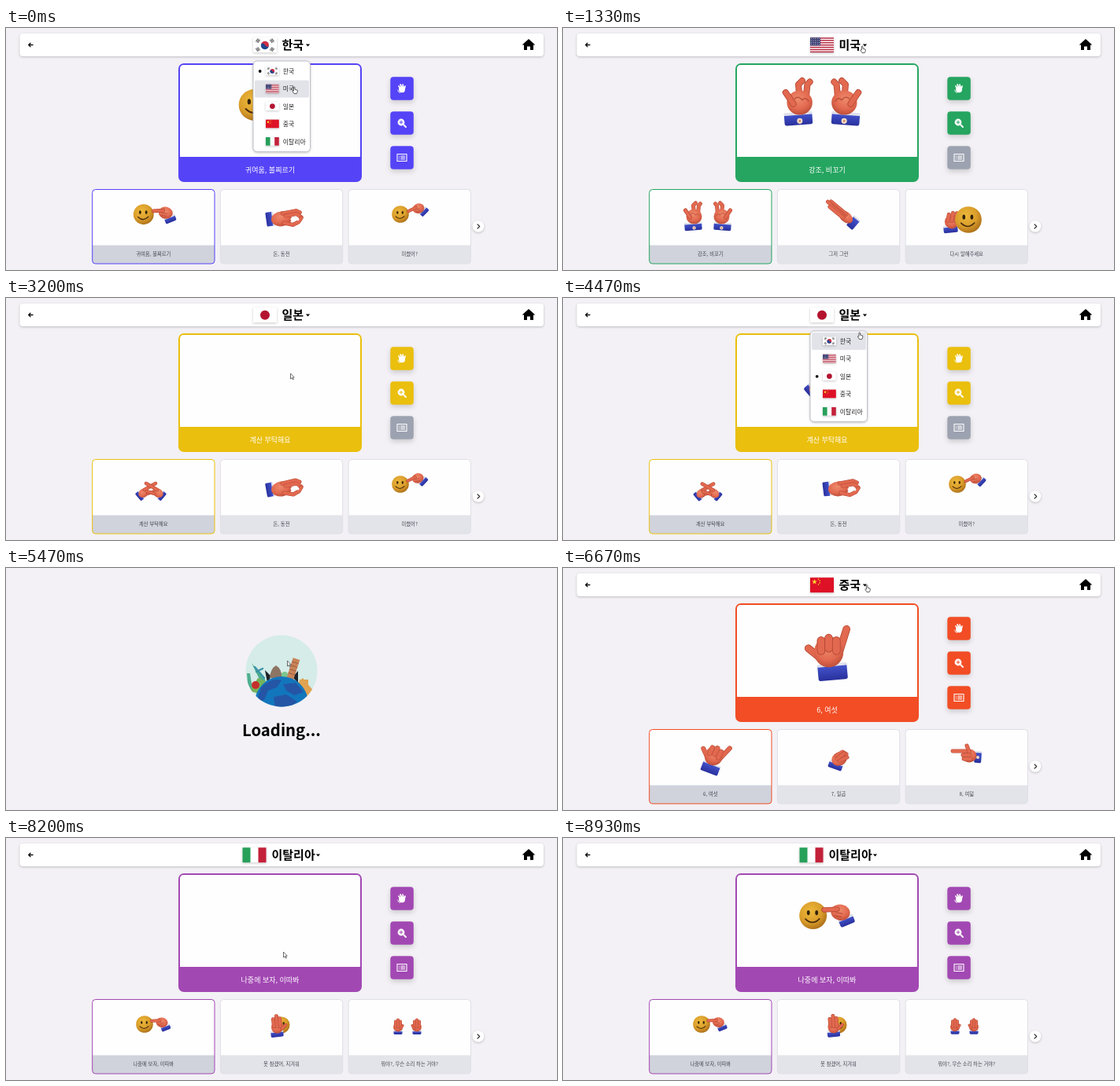
An HTML page that plays this animation: 700x308 px, repeating every 9000 ms.

```html
<!DOCTYPE html>
<html lang="ko">
<head>
<meta charset="utf-8">
<style>
html, body { margin: 0; width: 100%; height: 100%; overflow: hidden; background: #f3f1f5; }
svg { display: block; width: 100vw; height: 100vh; }
text { font-family: "Noto Sans CJK KR", "Noto Sans CJK", "Noto Sans CJK JP", sans-serif; }
.mid { text-anchor: middle; }
.soft { filter: drop-shadow(0 1px 1.5px rgba(0,0,0,.22)); }
.lift { filter: drop-shadow(0 3px 3px rgba(0,0,0,.16)); }
</style>
</head>
<body>
<svg id="stage" viewBox="0 0 700 308"></svg>
<script>
const LOOP = 9000, FPS = 15;

// ---- drawing helpers
const rect = (x, y, w, h, fill, r = 0, more = '') =>
  `<rect x="${x}" y="${y}" width="${w}" height="${h}" rx="${r}" fill="${fill}" ${more}/>`;
const disc = (x, y, r, fill) => `<circle cx="${x}" cy="${y}" r="${r}" fill="${fill}"/>`;
const line = (d, color, w) =>
  `<path d="${d}" fill="none" stroke="${color}" stroke-width="${w}" stroke-linecap="round" stroke-linejoin="round"/>`;
const shape = (d, fill) => `<path d="${d}" fill="${fill}"/>`;
const group = (transform, body) => `<g transform="${transform}">${body}</g>`;
const at = (x, y, s, body, rot = 0) => group(`translate(${x} ${y}) rotate(${rot}) scale(${s})`, body);
const text = (x, y, size, weight, fill, str, cls = '') =>
  `<text x="${x}" y="${y}" font-size="${size}" font-weight="${weight}" fill="${fill}" class="${cls}">${str}</text>`;
const move = (kind, body) => `<g class="move" data-kind="${kind}">${body}</g>`;

// ---- flags, on a 30 x 19 field
const flagArt = {
  kr: rect(0, 0, 30, 19, '#fff') + disc(15, 9.5, 5, '#cf2f45') +
    shape('M10.2 8.2A5 5 0 1 0 19.8 10.8Q17.5 13 15 9.5Q12.5 6 10.2 8.2', '#20478f') +
    [[6, 4, -56], [24, 4, 56], [6, 15, 56], [24, 15, -56]].map(([x, y, a]) =>
      at(x, y, 1, line('M-2 -1.5H2M-2 0H2M-2 1.5H2', '#222', .8), a)).join(''),
  us: rect(0, 0, 30, 19, '#fff') +
    Array.from({ length: 7 }, (_, i) => rect(0, i * 2.92, 30, 1.46, '#b5263f')).join('') +
    rect(0, 0, 13, 10.2, '#3b3f73') +
    Array.from({ length: 20 }, (_, i) => disc(1.5 + i % 5 * 2.5, 1.4 + (i / 5 | 0) * 2.4, .5, '#fff')).join(''),
  jp: rect(0, 0, 30, 19, '#fff') + disc(15, 9.5, 6, '#b3132f'),
  cn: rect(0, 0, 30, 19, '#de1126') +
    shape('M5.5 2L6.4 4.3H8.8L6.9 5.8L7.6 8.2L5.5 6.8L3.4 8.2L4.1 5.8L2.2 4.3H4.6Z', '#ffd92e') +
    [[10.5, 2], [12.3, 4], [12.3, 6.8], [10.5, 8.8]].map(([x, y]) => disc(x, y, .8, '#ffd92e')).join(''),
  it: rect(0, 0, 30, 19, '#fff') + rect(0, 0, 10, 19, '#27a05a') + rect(20, 0, 10, 19, '#c3213a'),
};
const flag = (id, x, y, s) =>
  `<g class="soft">${at(x, y, s, flagArt[id])}</g>`;

// ---- hands and faces
const SKIN = '#e2694f', EDGE = '#b64a36', GLOW = '#ee8a6c';
const finger = (d, w = 5) => line(d, EDGE, w) + line(d, SKIN, w - 1.1);
const palm = (x, y, rx, ry, rot = 0) => group(`translate(${x} ${y}) rotate(${rot})`,
  `<ellipse rx="${rx}" ry="${ry}" fill="url(#skin)"/>`);
const cuff = (w, h, x, y, rot = 0, button = '') => at(x, y, 1,
  rect(-w / 2, -h / 2, w, h, 'url(#cloth)', 1.6) +
  rect(-w / 2 - .3, -h / 2 - 1, w + .6, 2.2, '#dfe0ea', 1) +
  (button && disc(1, 1.5, 2.2, '#f1d9c4') + disc(1, 1.5, .8, '#c98356')), rot);
const face = (x, y, r) => at(x, y, r / 10,
  `<circle r="10" fill="url(#sun)"/>` +
  `<ellipse cx="-3.4" cy="-2" rx="1.1" ry="1.8" fill="#33230c"/><ellipse cx="2.6" cy="-2" rx="1.1" ry="1.8" fill="#33230c"/>` +
  line('M-5.5 2.6Q-.5 7.6 4.6 2.4', '#4a2d0c', 1));

const pointing = turn => face(-11, 1, 10.8) + move('poke', group(`rotate(${turn} -2 -3)`,
  cuff(12, 6, 16.5, 6, -22) + palm(11.5, -1, 7.5, 6.3, 10) + finger('M-1.5 -3L9 -3.5', 4) +
  line('M7 1.5L12 2.5M8 -1L13 0', EDGE, .7)));
const quote = move('bend', finger('M1 -4L0 -15L3 -18') + finger('M6 -4L7 -15L9 -17')) +
  cuff(22, 9, 0, 13, -4, true) + palm(1, 0, 10, 9.5) + finger('M-4 1L-10 -8') +
  line('M-3 -3Q0 -6 3 -2M3 -2Q6 -5 8 -1', EDGE, .8);
const crossed = cuff(12, 6, -14, 8, 50) + palm(-9, 4, 7, 5.5, -35) +
  finger('M-8 0L6 -8', 4.5) + finger('M-4 5L5 2', 4);

const poses = {
  point: pointing(0),
  crazy: pointing(-24),
  coin: move('sway', cuff(18, 9, -18, 2, 80) + palm(-3, 1, 13, 9.5, -8) +
    finger('M-2 -6L15 -10L20 -8') + finger('M2 -3L16 -6L22 -2') + finger('M0 6L12 8L19 4L22 -1') +
    line('M10 1Q14 -3 18 1', '#fff', 3)),
  quotes: at(-18.5, 0, 1, quote) + group('translate(18.5 0) scale(-1 1)', quote),
  flat: move('sway', at(0, 0, 1, cuff(10, 15, 19, 0, 0) + palm(7, 0, 10, 6.5) +
    finger('M5 -3L-20 -3') + finger('M5 0L-23 0') + finger('M5 3L-17 3.4') + line('M6 -1H-18', EDGE, .6), 38)),
  listen: move('sway', cuff(18, 8, -14, 13, -8) + palm(-13, 3, 9, 9) +
    finger('M-18 2L-17 -6') + finger('M-13 2L-12 -8') + finger('M-8 2L-7 -8')) + face(8, 0, 16.8),
  cross: move('poke', crossed) + group('scale(-1 1)', move('poke', crossed)),
  six: move('rock', cuff(23, 12, 4, 16, -5) + finger('M-4 6L-15 -3', 6) + finger('M9 1L15 -18', 6) +
    palm(1, 0, 11.5, 12) + [[-5, -9], [1, -11], [7, -9]].map(([x, y]) => finger(`M${x} ${y}L${x} ${y + 8}`, 6.6)).join('')),
  seven: move('sway', cuff(18, 8, -5, 8, 20) + palm(0, -1, 10, 8.5, -25) +
    finger('M-4 -5L4 -10L9 -7') + finger('M0 1L10 -3') + finger('M-3 -1L6 -8')),
  eight: move('sway', cuff(9, 14, 15, 4, 4) + palm(4, 2, 9.5, 8.5) + finger('M3 -4L-17 -4', 5) +
    finger('M4 -3L1 -11', 5) + finger('M5 1L-4 1', 5) + finger('M6 6L-3 6', 5) + disc(15, 4, 2, '#f1d9c4')),
  fedUp: face(2, -2, 10.5) + move('poke', cuff(16, 7, -3, 10, -6) + palm(-3, 1, 7.5, 8) +
    finger('M-7 0L-8 -9') + finger('M-3 0L-4 -13') + finger('M1 0L0 -10') + finger('M3 3L8 -2', 4)),
  what: [-12, 12].map(x => group(`translate(${x} 0) scale(${x < 0 ? 1 : -1} 1)`, move('bend',
    cuff(11, 5, 0, 7) + palm(0, 0, 6, 6) + finger('M-3 0L-3 -7', 4) + finger('M0 0L0 -9', 4) +
    finger('M3 0L3 -7', 4) + finger('M4 2L6 -2', 3)))).join(''),
};

// ---- countries: thumbs are [label, pose, x, y, scale, turn]; main is [x, y, scale]
const countries = [
  { id: 'kr', name: '한국', color: '#5543f7', start: -1200, main: [336, 96, 1.85], thumbs: [
    ['귀여움, 볼찌르기', 'point', 188, 236, 1.2], ['돈, 동전', 'coin', 353, 242, 1], ['미쳤어?', 'crazy', 512, 236, 1]] },
  { id: 'us', name: '미국', color: '#25a560', start: 133, locked: true, main: [329, 95, 1.62], thumbs: [
    ['강조, 비꼬기', 'quotes', 184, 240, 1], ['그저 그런', 'flat', 354, 236, 1], ['다시 말해주세요', 'listen', 507, 244, 1]] },
  { id: 'jp', name: '일본', color: '#eabf0d', start: 3133, locked: true, main: [336, 106, 1.62], thumbs: [
    ['계산 부탁해요', 'cross', 184, 244, 1], ['돈, 동전', 'coin', 353, 242, 1], ['미쳤어?', 'crazy', 512, 236, 1]] },
  { id: 'cn', name: '중국', color: '#f24d25', start: 5600, main: [336, 107, 1.62], thumbs: [
    ['6, 여섯', 'six', 190.5, 239, 1, 26], ['7, 일곱', 'seven', 351, 244, 1], ['8, 여덟', 'eight', 512, 237, 1]] },
  { id: 'it', name: '이탈리아', color: '#a248b3', start: 8200, main: [335.5, 97, 1.62], thumbs: [
    ['나중에 보자, 이따봐', 'point', 187, 236, 1], ['못 참겠어, 지겨워', 'fedUp', 348, 240, 1], ['뭐야?, 무슨 소리 하는 거야?', 'what', 510, 241, 1]] },
];

const icons = [
  at(503, 77, 1, line('M-2 0L-4 -3M0 -1L-2 -5M2 -1L1 -5M3 1L4 -3', '#fff', 1.7) +
    `<ellipse cx="0" cy="1.2" rx="4" ry="4" fill="#fff"/>` + line('M-5.5 2Q-5 5 -2.5 5.5', '#fff', .8)),
  at(503, 121, 1, disc(-1, -1, 4.4, '#fff') + line('M2.5 2.5L5 5', '#fff', 2)),
  at(503, 165, 1, line('M-6 -4.5H6V4.5H-6Z', '#fff', 1.1) +
    line('M-3.6 -2H-3.4M-3.6 0H-3.4M-3.6 2H-3.4M-1.4 -2H3.6M-1.4 0H3.6M-1.4 2H3.6', '#fff', 1.1)),
];

const header =
  `<g class="soft">${rect(17.5, 7, 665.5, 29, '#fff', 4)}</g>` +
  line('M34 21.5H29M31 19.2L28.7 21.5L31 23.8', '#111', 1.3) +
  shape('M664 14L672.3 21.6H670V28H666V23.5H662V28H658V21.6H655.7Z', '#000');

function page(c) {
  const wide = c.name.length > 2, fx = wide ? 300.5 : 314, caret = wide ? 396.5 : 383.5;
  const [mainLabel, mainPose] = c.thumbs[0];
  const buttons = icons.map((icon, i) =>
    `<g class="lift">${rect(488.3, 62.3 + i * 44, 29.5, 29.5, i === 2 && c.locked ? '#9ca2b0' : c.color, 4)}</g>` + icon).join('') +
    line('M500 120H504M502 118V122', c.color, 1);
  const cards = c.thumbs.map(([label, pose, x, y, s, turn = 0], i) => {
    const left = 109.7 + i * 162.7;
    return rect(left, 205.5, 155.3, 94.5, '#fefefe', 4) +
      shape(`M${left} 276.5h155.3v19.5q0 4 -4 4h-147.3q-4 0 -4 -4z`, i ? '#e3e4ea' : '#d0d3dc') +
      rect(left, 205.5, 155.3, 94.5, 'none', 4, `stroke="${i ? '#dedfe5' : c.color}" stroke-width="1"`) +
      at(x, y, s, poses[pose], turn) +
      text(left + 77.6, 290.3, 6.3, 400, '#42464f', label, 'mid');
  }).join('');
  return `<g id="${c.id}">` + header + flag(c.id, fx, 12.2, 1) +
    text(wide ? 337.5 : 350.5, 26.6, 15, 900, '#000', c.name) +
    shape(`M${caret - 2.6} 20.4h5.2l-2.6 3z`, '#000') +
    rect(219, 45, 233, 151, c.color, 7) + shape('M221 164V52q0 -5 5 -5H445q5 0 5 5V164Z', '#fefefe') +
    `<g class="main">${at(...c.main, poses[mainPose])}</g>` +
    text(335.5, 184.3, 9, 500, '#fff', mainLabel, 'mid') +
    buttons + cards +
    `<g class="soft">${disc(600, 252.5, 7.3, '#fff')}</g>` + line('M599 249.8L601.7 252.5L599 255.2', '#222', 1.1) +
    '</g>';
}

const rowY = i => 55 + i * 22.4;
const menu = '<g id="menu">' +
  `<g class="soft">${rect(314, 42, 72.5, 115.5, '#fff', 5, 'stroke="#b9bcc6" stroke-width=".9"')}</g>` +
  rect(316, 0, 69, 22, '#e2e3e9', 2, 'id="hover"') +
  '<circle id="dot" cx="322.7" r="1.9" fill="#111"/>' +
  countries.map((c, i) => flag(c.id, 330, rowY(i) - 5.6, .56) + text(351.7, rowY(i) + 3, 7.9, 400, '#222', c.name)).join('') +
  '</g>';

const loading = '<g id="load">' + disc(350, 131, 45.5, '#d5ece8') + '<g clip-path="url(#round)">' +
  shape('M306 134h4l4 26h-6zM312 121l18 22l-5 5z', '#4fae8d') +
  line('M316 126L328 140M318 132L326 128', '#3b95a6', 2.5) +
  shape('M310 156L320 140L334 146L326 162Z', '#76b35c') + disc(317, 149, 5, '#c52f2b') +
  shape('M329 130L337 138L332 146ZM371 131L364 139L371 146Z', '#1c2228') +
  shape('M335 140Q336 128 343 124Q350 128 351 140Z', '#8c7564') +
  disc(354, 136, 4, '#7cc68d') +
  at(365, 128, 1, rect(-4.5, -13, 9, 27, '#c98358') + line('M-4 -8H4M-4 -3H4M-4 2H4M-4 7H4', '#9d5c3f', 1), 18) +
  shape('M366 150L377 140L392 158L380 164ZM372 142H384V152Z', '#e0a351') +
  disc(350, 172, 34, '#1276bd') +
  shape('M324 152Q338 139 350 143L344 152L333 156L328 168L319 170ZM352 148L368 146L378 158L366 162L356 156ZM340 164L356 161L370 170L360 178H342Z', '#2456a5') +
  '</g>' + text(350, 214, 20.3, 900, '#000', 'Loading...', 'mid') + '</g>';

const cursors =
  `<g id="arrow">${`<path d="M-1.5 -4V3L.2 1.5L1.4 4L2.4 3.5L1.3 1.1H3.3Z" fill="#fff" stroke="#333" stroke-width=".7"/>`}</g>` +
  `<g id="finger"><path d="M-1.6 1V-3.6q.8 -1 1.6 0V-.8L3.2 .1V2.4L2.2 4.6H-1L-3.2 1.2Q-2.6 .2 -1.6 1Z" fill="#fff" stroke="#222" stroke-width=".7"/></g>`;

const stage = document.getElementById('stage');
stage.innerHTML = `<defs>
  <radialGradient id="sun" cx=".4" cy=".35" r=".7"><stop offset="0" stop-color="#edb93c"/><stop offset=".6" stop-color="#d99c2a"/><stop offset="1" stop-color="#a86b18"/></radialGradient>
  <radialGradient id="skin" cx=".45" cy=".35" r=".7"><stop offset="0" stop-color="${GLOW}"/><stop offset=".6" stop-color="${SKIN}"/><stop offset="1" stop-color="${EDGE}"/></radialGradient>
  <linearGradient id="cloth" x2="0" y2="1"><stop offset="0" stop-color="#4455cf"/><stop offset="1" stop-color="#29309c"/></linearGradient>
  <clipPath id="round"><circle cx="350" cy="131" r="45.5"/></clipPath></defs>` +
  countries.map(page).join('') + menu + loading + cursors;

// ---- timeline
const scenes = [[0, 'kr'], [133, 'us'], [2933, 'load'], [3133, 'jp'], [5267, 'load'], [5600, 'cn'], [7867, 'load'], [8200, 'it']];
const menuOpen = [[0, 133], [1533, 2933], [4133, 5267], [6867, 7867]];
const path = [[0, 367, 79], [400, 367, 79], [1200, 381, 27], [1650, 381, 27], [2450, 363, 100], [3300, 363, 100],
  [3950, 383, 26], [4250, 383, 26], [4950, 359, 122], [5700, 359, 122], [6500, 387, 26], [6950, 387, 26],
  [7550, 354, 149], [8450, 354, 149], [8870, 372, 8]];

const el = id => document.getElementById(id);
const show = (node, on) => { node.style.display = on ? '' : 'none'; };
const ease = k => k * k * (3 - 2 * k);

function cursorAt(t) {
  const i = path.findIndex(p => p[0] > t);
  if (i < 0) return null;
  const [t0, x0, y0] = path[i - 1], [t1, x1, y1] = path[i];
  const k = ease((t - t0) / (t1 - t0));
  return [x0 + (x1 - x0) * k, y0 + (y1 - y0) * k];
}

const motions = {
  poke: a => `translate(${a * 1.2} ${a * .5})`,
  bend: a => `translate(0 ${a})`,
  rock: a => `rotate(${a * 9})`,
  sway: a => `rotate(${a * 3})`,
};

function draw(t) {
  const scene = scenes.filter(s => s[0] <= t + 1).pop()[1];
  [...countries.map(c => c.id), 'load'].forEach(id => show(el(id), id === scene));

  const index = countries.findIndex(c => c.id === scene);
  if (index >= 0) {
    const root = el(scene), age = t - countries[index].start;
    const swing = Math.sin((age - 1070) / 1000 * 2 * Math.PI);
    root.querySelectorAll('.move').forEach(m => m.setAttribute('transform', motions[m.dataset.kind](swing)));
    show(root.querySelector('.main'), age % 2000 >= 200);
  }

  const open = menuOpen.some(([a, b]) => t + 1 >= a && t + 1 < b);
  const pos = cursorAt(t);
  show(el('menu'), open);
  if (open) {
    const row = Math.floor((pos[1] - 44) / 22.4);
    show(el('hover'), row >= 0 && row < 5);
    el('hover').setAttribute('y', rowY(row) - 11);
    el('dot').setAttribute('cy', rowY(index));
  }

  const pointer = open || (pos && pos[1] < 34 && scene !== 'load');
  show(el('arrow'), pos && !pointer);
  show(el('finger'), pos && pointer);
  if (pos) el(pointer ? 'finger' : 'arrow').setAttribute('transform', `translate(${pos})`);
}

const begin = performance.now();
function tick() {
  const t = (performance.now() - begin) % LOOP;
  draw(Math.floor((t + 4) * FPS / 1000) * 1000 / FPS % LOOP);
  requestAnimationFrame(tick);
}
tick();
</script>
</body>
</html>
```
